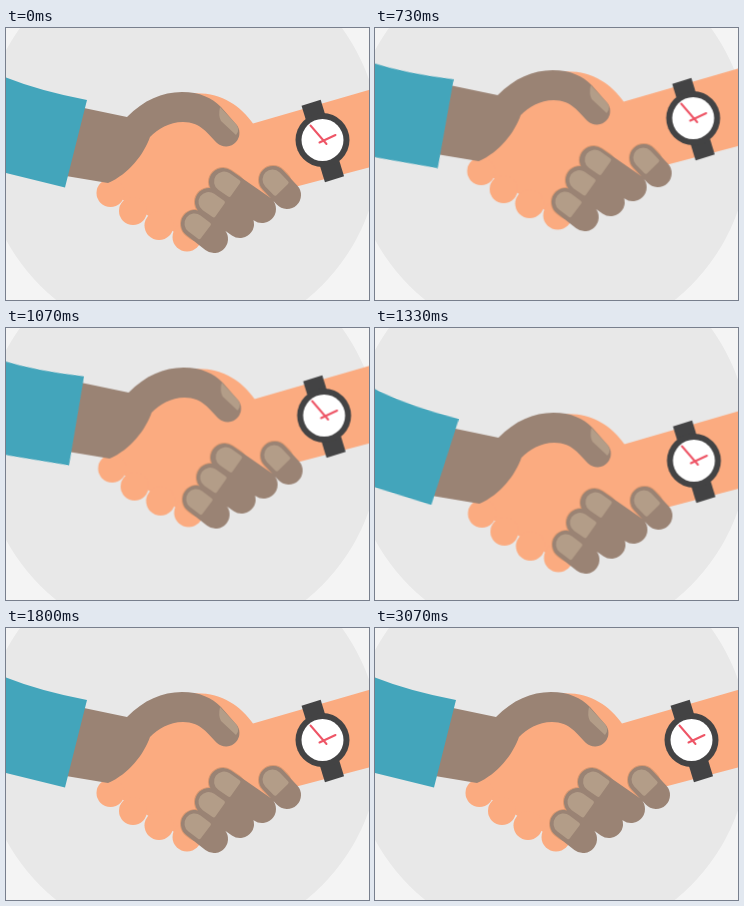
Animation, 363 px wide and 272 px high, one loop 3.27 s. Source, as an HTML page without scripts:

```html
<!DOCTYPE html>
<html lang="en">
<head>
<meta charset="utf-8">
<title>Handshake</title>
<style>
  html, body { margin: 0; width: 100%; height: 100%; overflow: hidden; background: #f4f4f4; }
  svg { display: block; width: 100%; height: 100%; }

  .skin { fill: #fbab80; }
  .brown { fill: #9a8374; }
  .finger { stroke: #9a8374; stroke-width: 28; stroke-linecap: round; }
  .shade { stroke: #d9976f; stroke-width: 30; stroke-linecap: round; }
  .nail { fill: #b39d88; }
  .dark { fill: #434344; }
  .hand { stroke: #ee5566; stroke-width: 2; stroke-linecap: round; }

  .shake, .sleeve { animation: 3270ms cubic-bezier(.37, 0, .63, 1) infinite; }
  .shake { animation-name: shake; }
  .sleeve { animation-name: swing; transform-origin: -220px 110px; }

  /* Wind up, two pumps, then settle */
  @keyframes shake {
    0%, 6.12% { transform: translate(0, 0); }
    12.39% { transform: translate(.5px, 12px); }
    19.27% { transform: translate(1.5px, -44px); }
    27.22% { transform: translate(2px, 24px); }
    35.02% { transform: translate(1.5px, -36px); }
    41.9% { transform: translate(2.5px, 25px); }
    54.13%, 100% { transform: translate(0, 0); }
  }
  @keyframes swing {
    0%, 6.12% { transform: rotate(0deg); }
    12.39% { transform: translateX(.5px) rotate(2.1deg); }
    19.27% { transform: translateX(1px) rotate(-7.9deg); }
    27.22% { transform: translateX(1px) rotate(4.2deg); }
    35.02% { transform: translateX(1px) rotate(-6.6deg); }
    41.9% { transform: translateX(1px) rotate(4.4deg); }
    54.13%, 100% { transform: rotate(0deg); }
  }
</style>
</head>
<body>
<svg viewBox="0 0 363 272" preserveAspectRatio="none">
  <defs>
    <path id="nail" class="nail" d="M14 -8 Q14 -10 12 -10 H0 A10 10 0 0 0 0 10 H12 Q14 10 14 8 Z"/>
  </defs>

  <rect width="363" height="272" fill="#f4f4f4"/>
  <circle cx="175" cy="117" r="199" fill="#e8e8e8"/>

  <g class="shake">
    <!-- Right arm and its fingers -->
    <g class="skin">
      <path d="M180 66 C212 62 233 76 247 95.500 L380 57 V135 L285 160 L215 200 L181 212 L98 160 L150 90 Z"/>
      <circle cx="104.500" cy="165" r="14"/>
      <circle cx="127" cy="183" r="14"/>
      <circle cx="153" cy="197.500" r="14.500"/>
      <circle cx="181" cy="209" r="14.500"/>
    </g>

    <!-- Left forearm and thumb -->
    <path class="brown" d="M30 70 L121 89 C138 72 156 64 176 64 C194 64 206 70 215 79 L229 95
      A13.300 13.300 0 0 1 211 115 C202 106 195 94 177 94 C163 94 152 101 144 109
      C138 126 123 146 102 155 L30 143 Z"/>
    <path class="nail" d="M214 79 L229 95 Q235 101 230 107 L215 93 Q212 88 214 79 Z"/>

    <!-- Left hand's fingers -->
    <g class="shade">
      <path d="M217 154 l8 5.500 M203 174 l8 6 M189 196 l4 3 M267 152 l4 4"/>
    </g>
    <g class="finger">
      <path d="M217 154 L256 181 M203 174 L234 196 M189 196 L208 211 M267 152 L281 167"/>
    </g>
    <use href="#nail" transform="translate(218 153.500) rotate(35)"/>
    <use href="#nail" transform="translate(202.500 174) rotate(35)"/>
    <use href="#nail" transform="translate(188.500 195.500) rotate(37)"/>
    <use href="#nail" transform="translate(266.500 151.500) rotate(46)"/>

    <!-- Watch -->
    <g transform="translate(316.500 112)">
      <rect class="dark" x="-10" y="-39" width="20" height="80" transform="rotate(-17)"/>
      <circle class="dark" r="27"/>
      <circle r="21" fill="#fff"/>
      <path class="hand" d="M-12 -14.500 L4 4 M-3 2.500 L13 -5"/>
    </g>
  </g>

  <path class="sleeve" fill="#43a5bb" d="M-60 20 L0 49.500 Q34 63 81 72 L59 159.500 L0 145 L-60 127 Z"/>
</svg>
</body>
</html>
```
